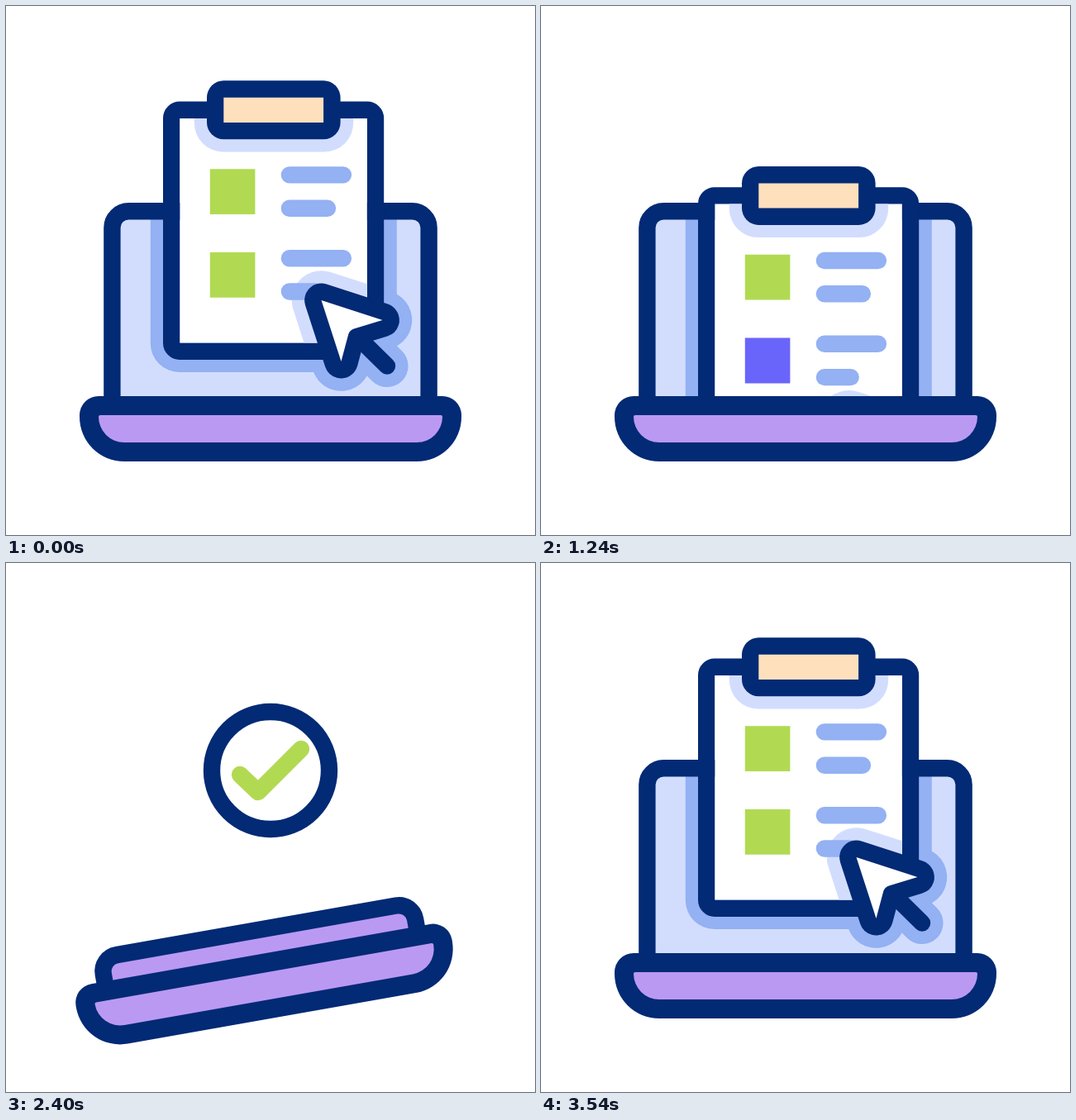
Write an HTML page with a canvas that moves like this. It is 640 px wide and 640 px high and loops after 3600 ms.

```html
<!DOCTYPE html>
<html lang="en">
<head>
<meta charset="utf-8">
<title>Online checklist</title>
<style>
  html, body { margin: 0; width: 100%; height: 100%; overflow: hidden; background: #fff; }
  canvas { display: block; width: 640px; height: 640px; }
</style>
</head>
<body>
<canvas id="stage"></canvas>
<script>
const LOOP = 3600, SIZE = 640, FLOOR = 500, LINE = 20.4, HALO = 15.4;
const NAVY = '#022a75', BLUE = '#93b1f3', LIGHT = '#d2ddfe', LILAC = '#ba99f2',
      GREEN = '#b1da52', VIOLET = '#6a65fa', PEACH = '#ffe0bd', YELLOW = '#ffcd50';

const arrow = new Path2D('M381.5 356 L455.5 380 L421 390.5 Q416 392 414.3 397 L405.5 430 Z');
const handle = new Path2D('M426 401 L461 435.5');
const notch = new Path2D('M470 385 L461 435 L405 434 L415 393 Z');
const baseOuter = new Path2D('M112 472 H528 A23 23 0 0 1 551 495 V497 A54 54 0 0 1 497 551 H143 A54 54 0 0 1 89 497 V495 A23 23 0 0 1 112 472 Z');
const baseInner = new Path2D('M114 495 H526 Q528 495 528 497 A31 31 0 0 1 497 528 H143 A31 31 0 0 1 112 497 Q112 495 114 495 Z');
const sheet = box(200.2, 125.8, 246.8, 292, 10);
const paper = box(210.4, 136, 226.4, 271.6, 0);
const ring = new Path2D();
ring.arc(320, 251, 71, 0, 2 * Math.PI);
const check = new Path2D('M283 256 L305 277 L357 225');

const canvas = document.getElementById('stage');
const ctx = canvas.getContext('2d');
const ratio = window.devicePixelRatio || 1;
canvas.width = canvas.height = SIZE * ratio;

// Eased progress from 0 to 1 between two times.
function ease(t, from, to) {
  const p = Math.min(1, Math.max(0, (t - from) / (to - from)));
  return p * p * (3 - 2 * p);
}

function poseAt(t) {
  const leave = to => ease(t, 1000, to);
  const back = ease(t, 2800, 3340);
  const reach = ease(t, 0, 700);
  const open = ease(t, 2800, 3000);
  let tilt = 0;
  for (let i = 0; i < 5; i++) {
    const turn = (i % 4 ? 20 : 10) * (i % 2 ? -1 : 1);
    tilt += turn * ease(t, 2000 + 200 * i, 2200 + 200 * i);
  }
  return {
    tilt,
    board: 511 * (leave(1620) - back) - 68 * (ease(t, 800, 1000) - ease(t, 3340, 3540)),
    x: 122 * leave(1380) - 94 * reach - 28 * back,
    y: 461 * leave(1640) - 2 * reach - 459 * back,
    closed: ease(t, 1600, 1800) - open,
    badge: 270 * (1 - ease(t, 1800, 2000) + open),
    lower: t >= 700 && t < 2000 ? VIOLET : GREEN
  };
}

function layer(draw) {
  ctx.save();
  draw();
  ctx.restore();
}

function box(x, y, w, h, r) {
  const path = new Path2D();
  path.roundRect(x, y, w, h, r);
  return path;
}

function fill(path, color) {
  ctx.fillStyle = color;
  ctx.fill(path);
}

function stroke(path, color, width = LINE) {
  ctx.strokeStyle = color;
  ctx.lineWidth = width;
  ctx.stroke(path);
}

function clipAtFloor() {
  ctx.clip(box(0, 0, SIZE, FLOOR, 0));
}

function turn(degrees) {
  ctx.translate(320, 541);
  ctx.rotate(degrees * Math.PI / 180);
  ctx.translate(-320, -541);
}

function mix(a, b, p) {
  const part = (hex, i) => parseInt(hex.slice(i, i + 2), 16);
  return 'rgb(' + [1, 3, 5].map(i => Math.round(part(a, i) + (part(b, i) - part(a, i)) * p)) + ')';
}

function pointer(color, extra) {
  fill(arrow, color);
  stroke(arrow, color, 2 * (LINE + extra));
  stroke(handle, color, LINE + 2 * extra);
}

function drawBadge(pose) {
  layer(() => {
    clipAtFloor();
    ctx.translate(0, pose.badge);
    fill(ring, '#fff');
    stroke(ring, NAVY);
    stroke(check, GREEN);
  });
}

function drawScreen(pose) {
  const top = 248.3 + 194.5 * pose.closed;
  const frame = box(128.4, top, 383.2, 495 - top, [20, 20, 0, 0]);
  layer(() => {
    turn(pose.tilt);
    fill(frame, mix(LIGHT, LILAC, pose.closed));
    layer(() => {
      ctx.clip(frame);
      turn(-pose.tilt);
      clipAtFloor();
      fill(box(174.8, 100 + pose.board, 298, 343, 35), BLUE);
      ctx.translate(pose.x, pose.y);
      pointer(BLUE, HALO);
    });
    stroke(frame, NAVY);
  });
}

function drawBoard(pose) {
  layer(() => {
    clipAtFloor();
    ctx.translate(0, pose.board);
    stroke(sheet, NAVY);
    layer(() => {
      ctx.translate(pose.x, pose.y - pose.board);
      fill(notch, BLUE);
    });
    fill(paper, '#fff');
    layer(() => {
      ctx.clip(paper);
      fill(box(227.8, 75, 192.4, 101.5, 35), LIGHT);
      ctx.translate(pose.x, pose.y - pose.board);
      pointer(LIGHT, HALO);
    });
    for (let row = 0; row < 2; row++) {
      const y = 194.2 + 100.8 * row;
      fill(box(246.8, y + 3, 54.6, 54.8, 0), row ? pose.lower : GREEN);
      fill(box(332.7, y, 85.4, LINE, LINE / 2), BLUE);
      fill(box(332.7, y + 40.3, 66.4 - 14.2 * row, LINE, LINE / 2), BLUE);
    }
    fill(box(243, 90.3, 161.6, 71, LINE), NAVY);
    fill(box(263.3, 110.8, 120.8, 30.2, 0), PEACH);
  });
}

function drawPointer(pose) {
  layer(() => {
    clipAtFloor();
    ctx.translate(pose.x, pose.y);
    pointer(NAVY, 0);
    fill(arrow, '#fff');
  });
}

function drawBase(pose) {
  layer(() => {
    turn(pose.tilt);
    fill(baseOuter, NAVY);
    fill(baseInner, LILAC);
  });
}

// Three strokes shooting outwards around a middle direction.
function drawSparks(fan, tail, head) {
  if (head <= 0 || tail >= 1) return;
  for (let i = -1; i <= 1; i++) {
    const angle = (fan.angle + fan.spread * i) * Math.PI / 180;
    const path = new Path2D();
    for (const p of [tail, head])
      path.lineTo(fan.x + fan.dx * i + Math.cos(angle) * fan.length * p,
                  fan.y + fan.dy * i + Math.sin(angle) * fan.length * p);
    stroke(path, YELLOW);
  }
}

const clickFan = { x: 214, y: 308, dx: -8, dy: 31, angle: 196, spread: -44.5, length: 41 };
const lidFan = { x: 319, y: 451, dx: 38.3, dy: 0, angle: -90, spread: 45, length: 57 };

function render(t) {
  const pose = poseAt(t);
  ctx.setTransform(ratio, 0, 0, ratio, 0, 0);
  ctx.fillStyle = '#fff';
  ctx.fillRect(0, 0, SIZE, SIZE);
  ctx.lineCap = ctx.lineJoin = 'round';
  if (pose.badge < 270) drawBadge(pose);
  drawScreen(pose);
  drawBoard(pose);
  drawPointer(pose);
  drawBase(pose);
  drawSparks(clickFan, ease(t, 800, 1000), ease(t, 700, 900));
  drawSparks(lidFan, ease(t, 2040, 2240), ease(t, 1840, 2040));
}

const start = performance.now();
function play() {
  render((performance.now() - start) % LOOP);
  requestAnimationFrame(play);
}
play();
</script>
</body>
</html>
```
